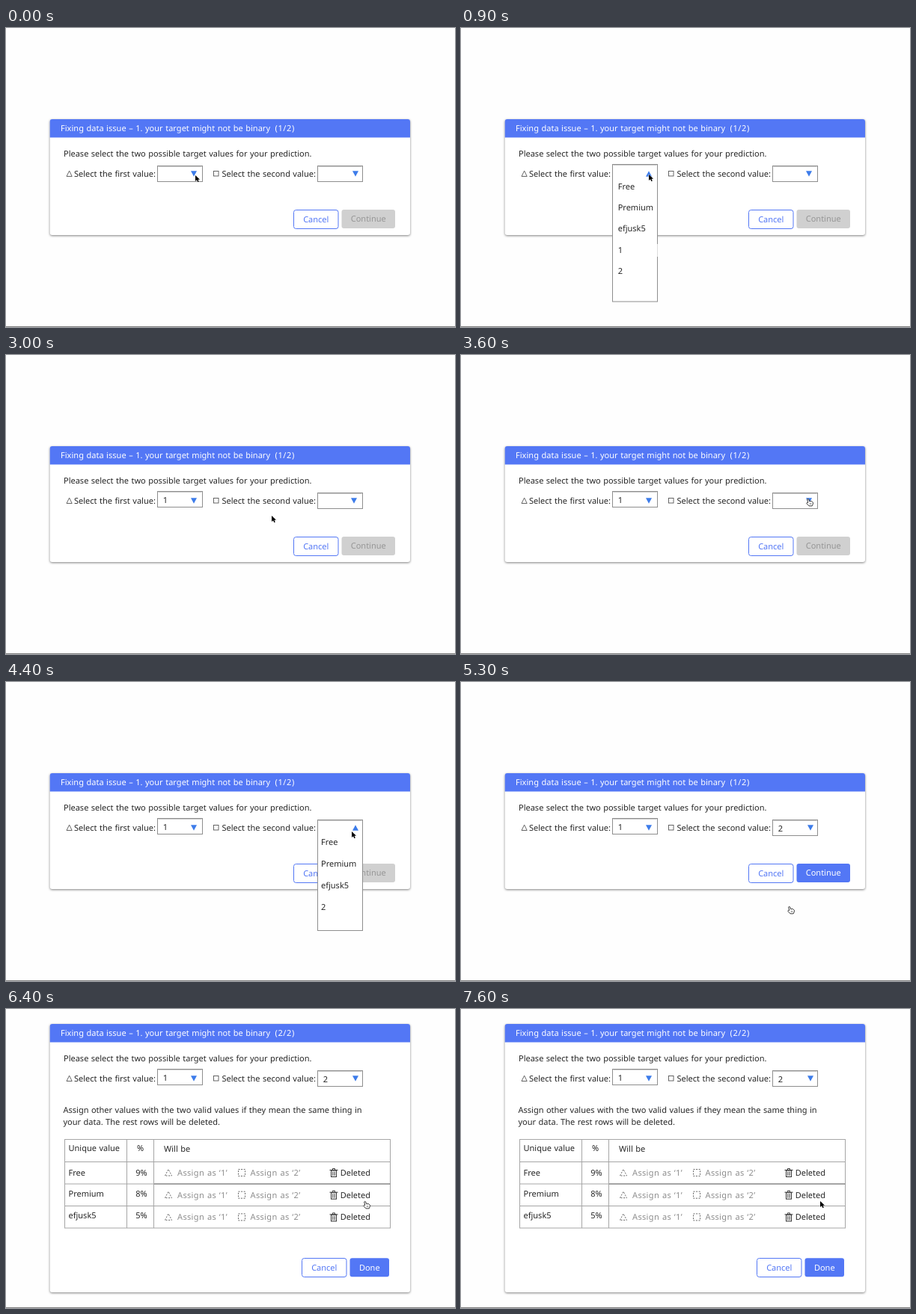
These frames come from a looping animation (600 px wide and 400 px high, 8 s). An HTML page:

```html
<!DOCTYPE html>
<html lang="en">
<head>
<meta charset="utf-8">
<title>Fixing data issue</title>
<style>
  html, body { margin: 0; width: 100%; height: 100%; overflow: hidden; background: #fefefe; }
  svg { display: block; width: 600px; height: 400px; }
  text {
    font: 11px "Noto Sans", "Open Sans", sans-serif;
    word-spacing: .6px;
    fill: #262626;
    white-space: pre;
    text-rendering: geometricPrecision;
  }
  .title { fill: #fff; letter-spacing: .03px; }
  .page { fill: #fff; letter-spacing: .6px; }
  .muted { fill: #8c8c8c; letter-spacing: .35px; }
  .button { text-anchor: middle; }
  .panel { fill: #fff; filter: drop-shadow(0 1px 1.4px rgba(0, 0, 0, .5)); }
  .field { fill: #fff; stroke: #8e8e8e; }
  .icon { fill: none; stroke: #555; stroke-width: .9; }
  .trash { fill: none; stroke: #333; }
  .dashed { fill: none; stroke: #666; stroke-dasharray: 2 1.6; }
  .grid { fill: none; stroke: #a6a6a6; }
</style>
</head>
<body>
<svg id="stage" viewBox="0 0 600 400"></svg>
<script>
const LOOP = 8000, STEP = 100;
const BLUE = '#5377f5';
const OPEN_FIRST = 900, PICK_FIRST = 2500, OPEN_SECOND = 4100, PICK_SECOND = 5300, NEXT_PAGE = 6400;

const text = (x, y, content, attrs = '') => `<text x="${x}" y="${y}" ${attrs}>${content}</text>`;
const rect = (x, y, w, h, attrs) => `<rect x="${x}" y="${y}" width="${w}" height="${h}" ${attrs}/>`;
const path = (d, attrs) => `<path d="${d}" ${attrs}/>`;
const shift = (x, y, content) => `<g transform="translate(${x} ${y})">${content}</g>`;
const during = (from, to, content) => `<g data-from="${from}" data-to="${to}">${content}</g>`;

function combo(x, y, height, arrowX, { up = false, value = '' } = {}) {
  const half = up ? -3.7 : 3.7;
  return rect(x, y, 60, height, 'class="field"')
    + path(`M${x + 1} ${y + 1}h58`, 'stroke="#ccc"')
    + path(`M${arrowX - 4} ${195 - half}h8l-4 ${2 * half}z`, 'fill="#3d7cea"')
    + text(x + 7.3, y + 15.8, value);
}

const options = (x, y, gap, labels) => labels.map((label, i) => text(x, y + gap * i, label)).join('');

function button(x, y, w, label, { fill = BLUE, color = '#fff', stroke = 'none' } = {}) {
  return rect(x, y, w, 25, `rx="3" fill="${fill}" stroke="${stroke}"`)
    + text(x + w / 2, y + 16.4, label, `class="button" style="fill:${color}"`);
}

const cancel = (x, y) => button(x, y, 59.5, 'Cancel', { fill: '#fff', color: BLUE, stroke: BLUE });

function panel(height, page) {
  return rect(58.7, 122, 481.3, height, 'rx="3" class="panel"')
    + path('M58.7 146.5V125q0-3 3-3H537q3 0 3 3v21.5z', `fill="${BLUE}"`)
    + text(73, 138, 'Fixing data issue – 1. your target might not be binary', 'class="title"')
    + text(359.5, 138, page, 'class="page"')
    + text(77, 172, 'Please select the two possible target values for your prediction.')
    + path('M81 198.5l3.6-7.4 3.6 7.4z', 'class="icon"')
    + text(91, 199, 'Select the first value:')
    + rect(277.5, 191.5, 6.5, 6.5, 'class="icon"')
    + text(288.5, 199, 'Select the second value:');
}

const firstPicked = combo(202.5, 182.5, 21, 251, { value: '1' });
const secondPicked = combo(416.5, 184.5, 21, 467, { value: '2' });

const selectPage = panel(155, '(1/2)')
  + cancel(384.5, 243.5)
  + during(0, PICK_SECOND, button(448.5, 243, 71.5, 'Continue', { fill: '#d0d0d0', color: '#969696' }))
  + during(PICK_SECOND, LOOP, button(448.5, 243, 71.5, 'Continue'))
  + during(0, OPEN_FIRST, combo(202.5, 184.5, 21, 251))
  + during(OPEN_FIRST, PICK_FIRST,
      combo(202.5, 182.5, 183.5, 251, { up: true })
      + rect(262, 289, 1, 17, 'fill="#ddd"')
      + options(209.7, 216, 28.2, ['Free', 'Premium', 'efjusk5', '1', '2']))
  + during(PICK_FIRST, LOOP, firstPicked)
  + during(0, OPEN_FIRST, combo(416.5, 184.5, 21, 467))
  + during(OPEN_FIRST, OPEN_SECOND, combo(416.5, 184.5, 21, 465))
  + during(OPEN_SECOND, PICK_SECOND,
      combo(416.5, 184.5, 148, 467, { up: true })
      + options(421, 217.7, 29.2, ['Free', 'Premium', 'efjusk5', '2']))
  + during(PICK_SECOND, LOOP, secondPicked);

const trash = path('M0 2.5H11M4 2V.5H7V2', 'class="trash"')
  + rect(2, 3, 7, 8.5, 'class="trash"')
  + path('M4.3 4.5v5.5m2.4 0v-5.5', 'class="trash"');

function tableRow(label, percent, i) {
  const labelY = 223 + 28.3 * i, actionY = 223 + 29.7 * i;
  return path(`M78.5 ${204.5 + 29.5 * i}H513.5`, 'class="grid"')
    + text(83.5, labelY, label)
    + text(173.2, labelY, percent)
    + path(`M212.5 ${actionY}l4.5-8.5 4.5 8.5z`, 'class="dashed"')
    + text(229, actionY, 'Assign as ‘1’', 'class="muted"')
    + rect(310.5, actionY - 8.5, 9, 9, 'class="dashed"')
    + text(326.5, actionY, 'Assign as ‘2’', 'class="muted"')
    + shift(432.5, actionY - 10, trash)
    + text(446.8, actionY, 'Deleted');
}

const assignPage = shift(0, -102, panel(359, '(2/2)') + firstPicked + secondPicked)
  + text(76.5, 139.3, 'Assign other values with the two valid values if they mean the same thing in')
  + text(76.5, 155, 'your data. The rest rows will be deleted.')
  + rect(78.5, 174.5, 435, 118.5, 'class="grid"')
  + path('M161.5 175V293M197.5 175V293', 'class="grid"')
  + text(83.5, 190, 'Unique value') + text(175, 190, '%') + text(211, 191.3, 'Will be')
  + [['Free', '9%'], ['Premium', '8%'], ['efjusk5', '5%']].map((row, i) => tableRow(...row, i)).join('')
  + path('M198 234H513.5', 'stroke="#777"')
  + cancel(395.5, 333.5)
  + button(459.5, 333.3, 52.5, 'Done');

const arrow = path('M0 0V8L2 6.3 3.4 9.2 4.8 8.5 3.5 5.7H6z',
  'fill="#000" stroke="#fff" stroke-width=".9" paint-order="stroke"');
const hand = path('M-1.3 1Q-.2-.4.7 1L1.6 3.8Q5 2.6 6.5 5.5 6.4 8 5.2 9.9H1L-2.2 6.5Q-2 5-.3 5.6z',
  'fill="#fff" stroke="#222" stroke-width=".9"') + path('M2.3 6v2m1.5 0v-2', 'stroke="#444" stroke-width=".6"');

const stage = document.getElementById('stage');
stage.innerHTML = rect(0, 0, 600, 400, 'fill="#fefefe"')
  + during(0, NEXT_PAGE, selectPage)
  + during(NEXT_PAGE, LOOP, assignPage)
  + rect(0, 399, 600, 1, 'fill="#808080"')
  + `<g id="cursor"><g id="arrow">${arrow}</g><g id="hand">${hand}</g></g>`;

// Each pointer move eases from the previous resting place.
const moves = [
  { start: 0, end: 1, x: 253, y: 197 },
  { start: 400, end: 700, x: 251, y: 196 },
  { start: 1400, end: 1800, x: 222, y: 308 },
  { start: 2000, end: 2300, x: 225, y: 301 },
  { start: 2700, end: 3000, x: 355, y: 215 },
  { start: 3100, end: 3600, x: 464, y: 192 },
  { start: 4000, end: 4400, x: 462, y: 200 },
  { start: 4400, end: 4900, x: 439, y: 300 },
  { start: 5600, end: 6200, x: 480, y: 257 }
];
const handTimes = [[500, OPEN_FIRST], [2100, 2800], [3500, OPEN_SECOND], [5000, 5700], [6200, 7100]];

const ease = k => k * k * (3 - 2 * k);
const progress = (t, { start, end }) => ease(Math.min(1, Math.max(0, (t - start) / (end - start))));

function pointerAt(t) {
  return moves.reduce((at, move) => {
    const k = progress(t, move);
    return { x: at.x + (move.x - at.x) * k, y: at.y + (move.y - at.y) * k };
  }, moves[0]);
}

const timed = [...stage.querySelectorAll('[data-from]')];
const [cursorEl, arrowEl, handEl] = ['cursor', 'arrow', 'hand'].map(id => document.getElementById(id));
const show = (el, visible) => { el.style.display = visible ? '' : 'none'; };

function render() {
  const t = Math.floor(performance.now() % LOOP / STEP) * STEP;
  for (const el of timed) show(el, t >= +el.dataset.from && t < +el.dataset.to);

  const { x, y } = pointerAt(t);
  const isHand = handTimes.some(([from, to]) => t >= from && t < to);
  cursorEl.setAttribute('transform', `translate(${x} ${y})`);
  show(arrowEl, !isHand);
  show(handEl, isHand);
  requestAnimationFrame(render);
}
render();
</script>
</body>
</html>
```
